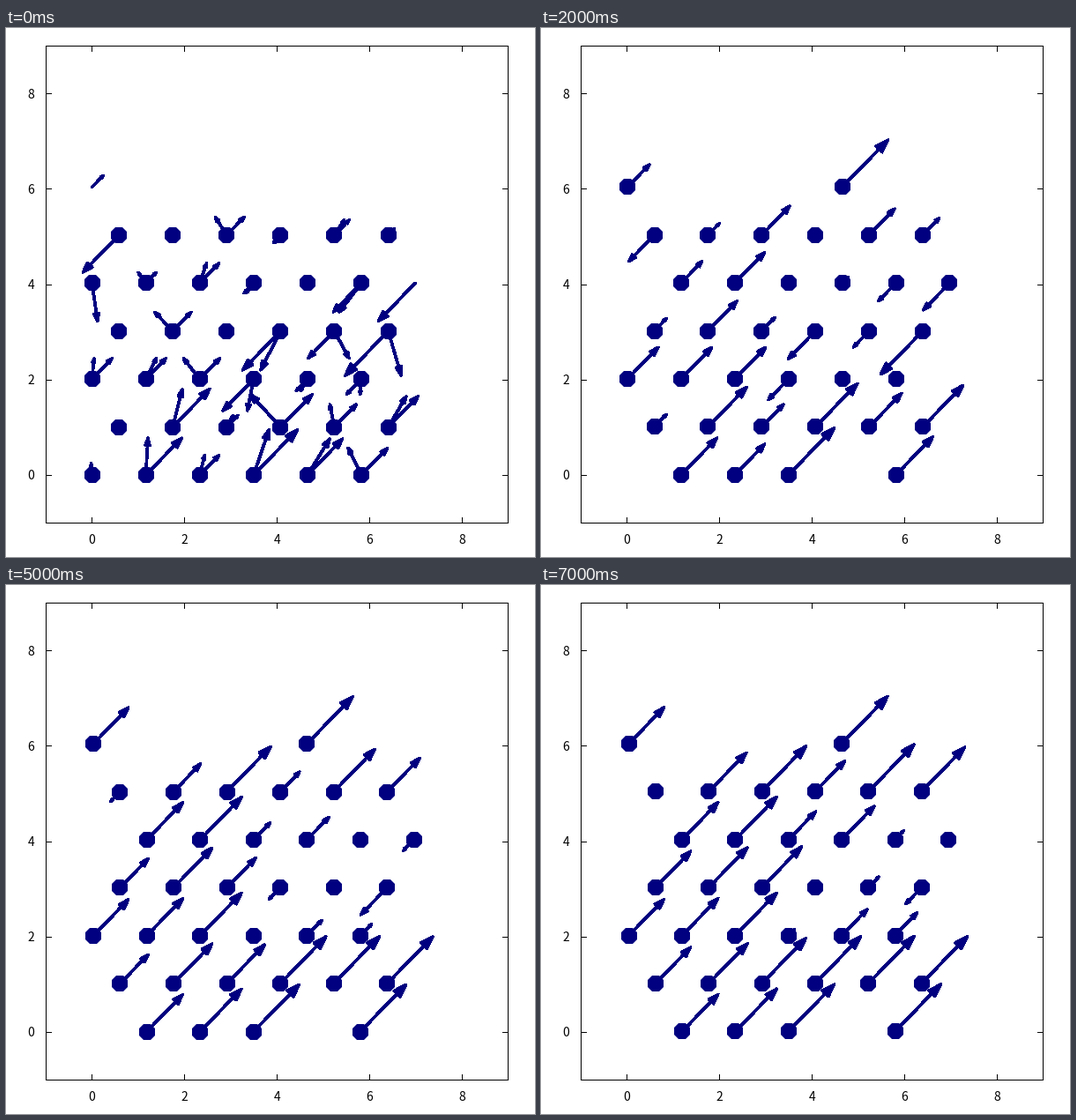
These frames come from a looping animation (600x600 px, 8000 ms). A matplotlib script:

```python
import random
import numpy as np
import matplotlib.pyplot as plt
from matplotlib.animation import FuncAnimation
from matplotlib.collections import LineCollection, PolyCollection

SIZE, DPI = 600, 100
PX = 72 / DPI              # one pixel in points
NAVY = "#000080"
STEPS = 8
GAIN = 6                   # growth of an arrow per step, pixels

fig = plt.figure(figsize=(SIZE / DPI, SIZE / DPI), dpi=DPI, facecolor="white")
ax = fig.add_axes([0, 0, 1, 1])
ax.set_xlim(0, SIZE)
ax.set_ylim(SIZE, 0)
ax.axis("off")


def draw_frame():
    left, right, top, bottom = 45.5, 569.5, 20.5, 561.5
    segs = [[(left, top), (right, top)], [(right, top), (right, bottom)],
            [(right, bottom), (left, bottom)], [(left, bottom), (left, top)]]
    style = dict(family="Noto Sans CJK JP", size=10, va="baseline")
    for v in range(0, 10, 2):
        x = round(97 + 52.5 * v) + 0.5
        y = round(507 - 54.1 * v) + 0.5
        segs += [[(x, bottom), (x, bottom - 6)], [(x, top), (x, top + 6)],
                 [(left, y), (left + 6, y)], [(right, y), (right - 6, y)]]
        ax.text(x, 585, str(v), ha="center", **style)
        ax.text(32, y + 5, str(v), ha="right", **style)
    ax.add_collection(LineCollection(segs, colors="black", linewidths=PX,
                                     capstyle="projecting", snap=False))


def site(row, col, t=0):
    """Pixel position of a lattice site; the lattice shrinks slowly sideways."""
    x = 97.5 + 61.1 * (col + 0.5 * (row % 2))
    y = 507 - 54.4 * row
    return x - (x - 281) * 0.012 * t / 7, y - 0.7 * t / 7


class Particle:
    """Sits at home until step `hop`; its arrow moves on one step earlier."""

    def __init__(self, home, start, dest=None, hop=STEPS + 1):
        self.home, self.start = home, start
        self.dest, self.hop = dest, hop

    def dot(self, t):
        return site(*(self.dest if t >= self.hop else self.home), t)

    def tail(self, t):
        return site(*(self.dest if t >= self.hop - 1 else self.home), t)

    def length(self, t):
        """Signed horizontal reach: steady growth up to a local limit."""
        x, _ = self.tail(t)
        limit = np.clip(40 + (x - 150) / 10, 40, 52)
        return np.clip(self.start + GAIN * t, -49, limit)


# Starting arrow reach, row by row: first column, then one value per site
START = [
    (1, [43, 22, 50]),
    (0, [2, 42, 13, 36, 25, 34]),
    (0, [23, 23, 23, -35, -13, -17]),
    (0, [2, 21, 3, -43, -30, -60]),
    (1, [12, 22, -11, -5, -32]),
    (0, [-41, 1, 20, -8, 17, 7]),
]

particles = [Particle((row, first + i), start)
             for row, (first, starts) in enumerate(START)
             for i, start in enumerate(starts)]
particles += [
    Particle((0, 5), 30),
    Particle((0, 4), 40, dest=(6, 4), hop=2),
    Particle((0, 0), 13, dest=(6, 0), hop=1),
    Particle((4, 0), -42, dest=(4, 6), hop=1),
]


def arrow(x, y, dx, dy):
    """Shaft segment and head triangle, the head a fifth of the length."""
    tx, ty = x + dx, y + dy
    bx, by = x + 0.8 * dx, y + 0.8 * dy
    wx, wy = -dy * 0.2 / 3, dx * 0.2 / 3
    return ([(x, y), (bx, by)],
            [(tx, ty), (bx + wx, by + wy), (bx - wx, by - wy)])


def kicks():
    """Random sideways arrows of the first step."""
    rng = random.Random(5)
    for p in particles:
        d = p.length(0)
        yield arrow(*p.dot(0), abs(d) * rng.uniform(-1, 0.7), -1.03 * d)


draw_frame()
shafts = LineCollection([], colors=NAVY, linewidths=2.7 * PX,
                        antialiaseds=False, capstyle="round")
heads = PolyCollection([], facecolors=NAVY, edgecolors=NAVY,
                       linewidths=2 * PX, antialiaseds=False,
                       joinstyle="round")
ax.add_collection(shafts)
ax.add_collection(heads)
dots, = ax.plot([], [], "8", ms=19 * PX, color=NAVY, mew=0,
                antialiased=False, snap=False)


def update(t):
    arrows = [arrow(*p.tail(t), p.length(t), -1.03 * p.length(t))
              for p in particles if abs(p.length(t)) >= 5]
    if t == 0:
        arrows += kicks()
    shafts.set_segments([shaft for shaft, _ in arrows])
    heads.set_verts([head for _, head in arrows])
    dots.set_data(*zip(*(p.dot(t) for p in particles)))
    return shafts, heads, dots


anim = FuncAnimation(fig, update, frames=STEPS, interval=1000,
                     repeat=True, repeat_delay=0, blit=False)
plt.show()
```
